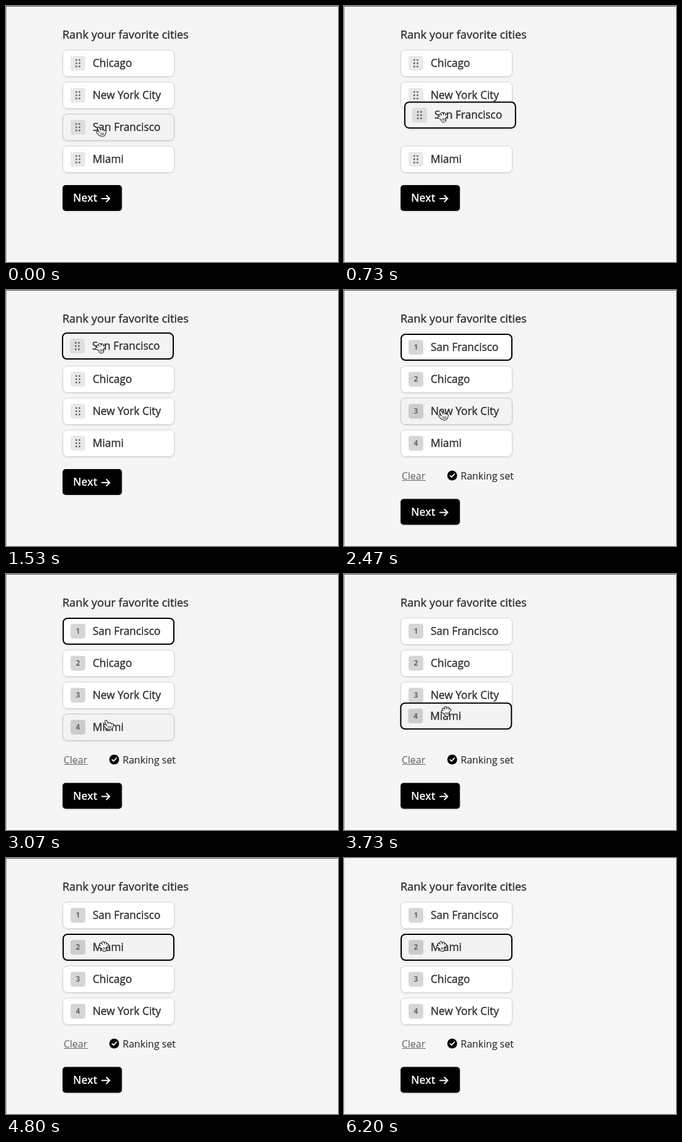
These frames come from a looping animation (540 by 416 pixels, 6.27 s). An HTML page with a canvas:

```html
<!DOCTYPE html>
<html lang="en">
<head>
<meta charset="utf-8">
<title>Rank your favorite cities</title>
<style>
  html, body { margin: 0; width: 100%; height: 100%; overflow: hidden; background: #f5f5f5; }
  canvas { display: block; width: 540px; height: 416px; }
</style>
</head>
<body>
<canvas id="stage"></canvas>
<script>
const W = 540, H = 416, LOOP = 6270, STEP = 1000 / 15;
const LEFT = 92, TOP = 71, PITCH = 52, CARD_W = 182, CARD_H = 44;
const FONT = '"Open Sans", "Noto Sans", sans-serif';
const PRESS_1 = 330, DROP_1 = 1665, PRESS_2 = 3330, DROP_2 = 4795, FADE = 6195;

const canvas = document.getElementById('stage');
const ctx = canvas.getContext('2d');
const ratio = window.devicePixelRatio || 1;
canvas.width = W * ratio;
canvas.height = H * ratio;

const clamp = v => Math.max(0, Math.min(1, v));
const easeOut = (k, power) => 1 - Math.pow(1 - k, power);
const smooth = k => k * k * (3 - 2 * k);
const dragEase = k => smooth(Math.pow(k, 0.8));
const glideEase = k => easeOut(k, 2.2);

// The pointer rests at these spots and glides between them along a slight bow.
const firstGrab = { x: 155, y: 197 };
const firstDrop = { x: 154, y: 91 };
const secondGrab = { x: 167, y: 238 };
const secondDrop = { x: 159, y: 140 };
const moves = [
  { start: 533, end: 1533, from: firstGrab, to: firstDrop, bow: 11, ease: dragEase },
  { start: 2000, end: 3067, from: firstDrop, to: secondGrab, bow: -2, ease: glideEase },
  { start: 3500, end: 4667, from: secondGrab, to: secondDrop, bow: 1.5, ease: dragEase }
];

function pointerAt(t) {
  const { start, end, from, to, bow, ease } = moves.findLast(m => t >= m.start) || moves[0];
  const k = ease(clamp((t - start) / (end - start)));
  return {
    x: from.x + (to.x - from.x) * k + bow * Math.sin(Math.PI * k),
    y: from.y + (to.y - from.y) * k
  };
}

function roundRect(x, y, w, h, r) {
  ctx.beginPath();
  ctx.roundRect(x, y, w, h, r);
}

function line(width, color, ...points) {
  ctx.beginPath();
  points.forEach(([x, y]) => ctx.lineTo(x, y));
  ctx.lineWidth = width;
  ctx.strokeStyle = color;
  ctx.stroke();
}

function disc(x, y, rx, ry, color) {
  ctx.beginPath();
  ctx.ellipse(x, y, rx, ry, 0, 0, 2 * Math.PI);
  ctx.fillStyle = color;
  ctx.fill();
}

// `swell` thickens the regular cut towards a medium weight.
function text(str, x, y, size, color, { weight = 400, swell = 0, align = 'left' } = {}) {
  ctx.font = `${weight} ${size}px ${FONT}`;
  ctx.textAlign = align;
  ctx.fillStyle = ctx.strokeStyle = color;
  ctx.fillText(str, x, y);
  if (swell) {
    ctx.lineWidth = swell;
    ctx.strokeText(str, x, y);
  }
}

function shadow(alpha) {
  ctx.shadowColor = `rgba(0,0,0,${alpha})`;
  ctx.shadowBlur = alpha ? 3 * ratio : 0;
  ctx.shadowOffsetY = alpha ? ratio : 0;
}

function drawCard({ name, x, y, rank, hover, focus }) {
  const radius = 8;
  shadow(0.12);
  roundRect(x, y, CARD_W, CARD_H, radius);
  ctx.fillStyle = hover ? '#f3f3f3' : '#fff';
  ctx.fill();
  shadow(0);

  const inset = focus ? 1 : 0.5;
  roundRect(x + inset, y + inset, CARD_W - 2 * inset, CARD_H - 2 * inset, radius - inset);
  ctx.lineWidth = 2 * inset;
  ctx.strokeStyle = focus ? '#000' : hover ? '#c8c8c8' : '#d6d6d6';
  ctx.stroke();

  roundRect(x + 13, y + 10, 24, 24, 4);
  ctx.fillStyle = rank ? 'rgba(0,0,0,.16)' : 'rgba(0,0,0,.085)';
  ctx.fill();
  if (rank) {
    text(rank, x + 25, y + 26.3, 12, '#666', { weight: 700, align: 'center' });
  } else {
    for (let i = 0; i < 6; i++) {
      disc(x + 22.3 + (i % 2) * 5.2, y + 16.8 + (i >> 1) * 5.2, 1.5, 1.5, '#666');
    }
  }
  text(name, x + 49, y + 28, 17.4, '#333', { swell: 0.45 });
}

// Paints a shape twice: a dark silhouette, then a slimmer white body.
function drawHand(x, y, shape) {
  ctx.save();
  ctx.translate(x, y);
  shape(4.6, '#111');
  shape(2.6, '#fff');
  for (let i = 0; i < 3; i++) line(0.9, '#222', [2.2 * i - 0.6, 1], [2.2 * i - 0.6, 5]);
  ctx.restore();
}

function pointingShape(width, color) {
  line(width, color, [-4.5, -6.5], [-0.5, 2]);
  line(width, color, [-6, 0], [-2, 4]);
  for (let i = 0; i < 3; i++) line(width, color, [0.5 + 2.8 * i, i - 3], [1 + 2.2 * i, 2]);
  disc(1.7, 3, 3 + width / 2, 2.4 + width / 2, color);
}

function openShape(width, color) {
  for (let i = 0; i < 5; i++) {
    const angle = -1.2 + 0.49 * i;
    const length = 9.2 - 0.8 * Math.abs(i - 2);
    line(width, color, [0.6, 2.5], [0.6 + length * Math.sin(angle), 2.5 - length * Math.cos(angle)]);
  }
  disc(1, 3.6, 2.4 + width / 2, 2.4 + width / 2, color);
}

function drawFooter(ranked) {
  const y = ranked ? 339.5 : 291;
  if (ranked) {
    text('Clear', 93.7, 307.5, 16, '#6c6c6c', { swell: 0.15 });
    line(1, '#6c6c6c', [94.5, 309.5], [132.5, 309.5]);
    disc(176, 301.5, 8, 8, '#000');
    line(1.8, '#fff', [172.6, 301.8], [175, 304.2], [179.5, 299.2]);
    text('Ranking set', 189.8, 307.5, 16, '#333', { swell: 0.2 });
  }
  shadow(0.12);
  roundRect(LEFT, y, 96.5, 42, 5);
  ctx.fillStyle = '#000';
  ctx.fill();
  shadow(0);
  text('Next', 109, y + 27.2, 17.4, '#fff', { weight: 600 });
  line(2, '#fff', [156, y + 22], [168.5, y + 22]);
  line(2, '#fff', [163.5, y + 17], [168.5, y + 22], [163.5, y + 27]);
}

function cardsAt(t, pointer) {
  const ranked = t >= DROP_1;
  const order = ['Chicago', 'New York City', 'Miami'];
  if (t >= DROP_2) order.unshift(order.pop());
  order.splice(ranked ? 0 : 2, 0, 'San Francisco');

  const held = t >= PRESS_2 ? 'Miami' : t >= PRESS_1 && !ranked ? 'San Francisco' : '';
  const focused = t < PRESS_1 ? '' : t < PRESS_2 ? 'San Francisco' : 'Miami';
  const dragging = held && t < DROP_2;
  const grab = ranked ? secondGrab : firstGrab;
  const makeRoom = ranked
    ? { 'New York City': 3850, Chicago: 4210 }
    : { 'New York City': 800, Chicago: 1110 };

  return order.map((name, i) => {
    let x = LEFT, y = TOP + i * PITCH;
    const under = pointer.y >= y && pointer.y <= y + CARD_H;
    if (dragging && name === held) {
      x += pointer.x - grab.x;
      y += pointer.y - grab.y;
    } else if (dragging && name in makeRoom) {
      y += PITCH * easeOut(clamp((t - makeRoom[name]) / 220), 3);
    }
    return {
      name, x, y,
      rank: ranked ? i + 1 : 0,
      hover: held ? name === held : under,
      focus: name === focused
    };
  });
}

function render(now) {
  const t = Math.floor((now % LOOP + 3.4) / STEP) * STEP;
  const faded = t >= FADE;
  const pointer = pointerAt(t);

  ctx.setTransform(ratio, 0, 0, ratio, 0, 0);
  ctx.lineCap = ctx.lineJoin = 'round';
  ctx.fillStyle = faded ? '#f6f6f6' : '#f5f5f5';
  ctx.fillRect(0, 0, W, H);
  ctx.fillStyle = faded ? '#e2e2e2' : '#a0a0a0';
  ctx.fillRect(0, 0, 1, H);
  ctx.fillStyle = faded ? '#e2e2e2' : '#5a5a5a';
  ctx.fillRect(0, 0, W, 1);

  text('Rank your favorite cities', 91.7, 53, 18.4, '#333', { swell: 0.45 });
  drawFooter(t >= DROP_1);
  cardsAt(t, pointer).sort((a, b) => a.focus - b.focus).forEach(drawCard);

  const pointing = t < PRESS_1 || (t >= DROP_1 && t < PRESS_2);
  if (pointing) drawHand(pointer.x, pointer.y + 8, pointingShape);
  else drawHand(pointer.x, pointer.y + 4, openShape);
}

const start = performance.now();
function tick() {
  render(performance.now() - start);
  requestAnimationFrame(tick);
}
tick();
</script>
</body>
</html>
```
